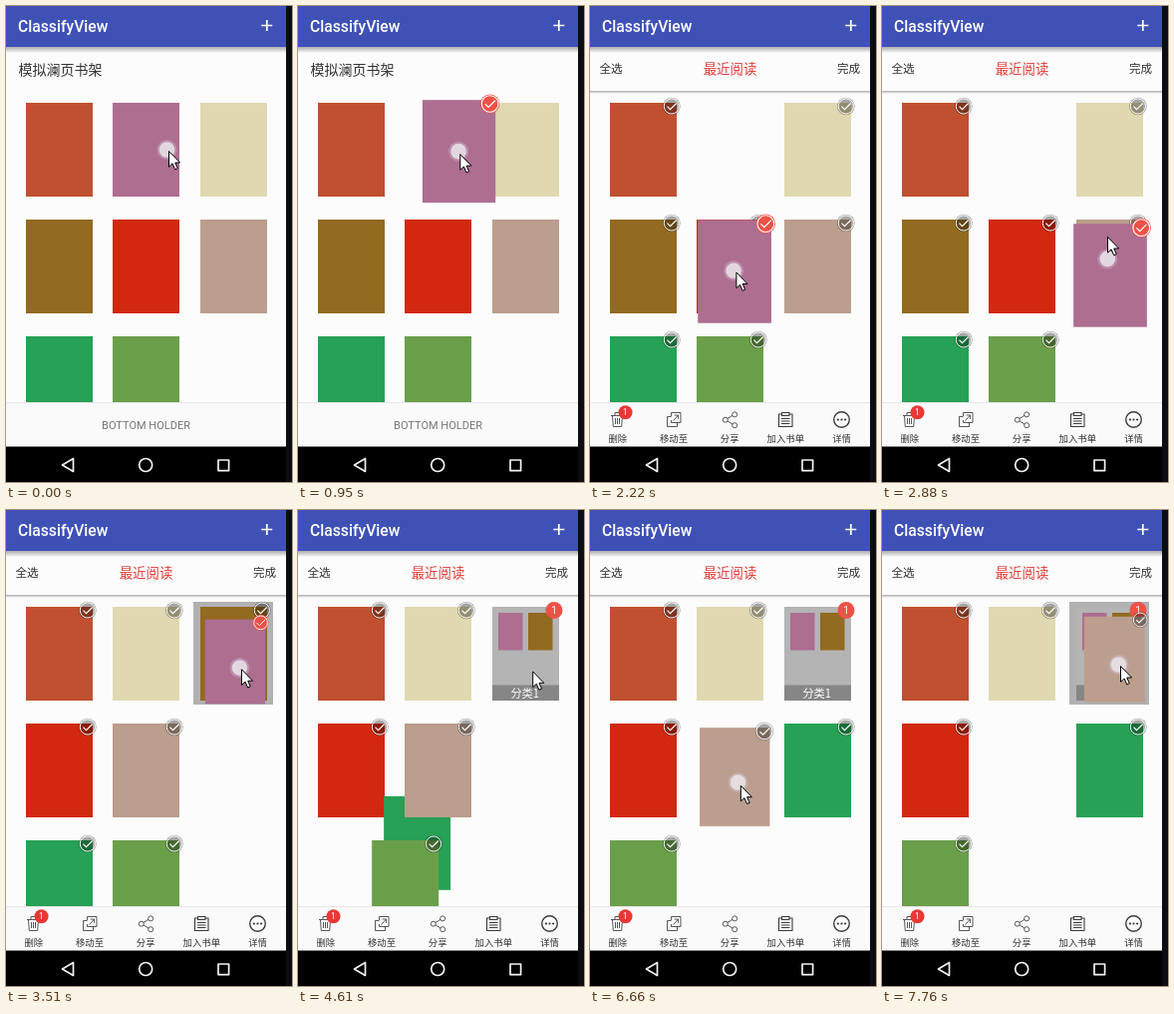
Write an HTML page that moves like this. It is 287 px wide and 477 px high and loops after 8000 ms.

```html
<!DOCTYPE html>
<html lang="zh-CN">
<head>
<meta charset="utf-8">
<title>ClassifyView</title>
<style>
  html, body { margin: 0; width: 100%; height: 100%; overflow: hidden; background: #fcfcfc; }
  svg { display: block; width: 100vw; height: 100vh; }
  text { font-family: Roboto, "Noto Sans CJK SC", "Noto Sans CJK", sans-serif; }
  .cjk { font-family: "Noto Sans CJK SC", "Noto Sans CJK", sans-serif; fill: #333; }
  .mid { text-anchor: middle; }
  .line { fill: none; stroke: #3c3c3c; stroke-width: .85; }
  .nav { fill: none; stroke: #f2f2f2; stroke-width: 1.7; stroke-linejoin: round; }
  .label { font-size: 9.4px; text-anchor: middle; }
</style>
</head>
<body>
<svg viewBox="0 0 287 477" preserveAspectRatio="none">
  <defs>
    <linearGradient id="shade" x1="0" y1="0" x2="0" y2="1">
      <stop offset="0" stop-color="#000" stop-opacity=".32"/>
      <stop offset="1" stop-color="#000" stop-opacity="0"/>
    </linearGradient>
  </defs>
  <rect width="287" height="477" fill="#fcfcfc"/>

  <g id="shelf">
    <rect id="frame" x="188" y="92" width="80" height="103" fill="#b1b1b1"/>
  </g>

  <text class="cjk" x="12.5" y="68.5" font-size="14">模拟澜页书架</text>
  <g id="editBar">
    <rect y="85" width="281" height="3" fill="url(#shade)"/>
    <rect y="41" width="281" height="44" fill="#fcfcfc"/>
    <text class="cjk" x="9.5" y="67" font-size="11.6">全选</text>
    <text class="cjk mid" x="140.5" y="67.8" font-size="13.4" style="fill:#e53935">最近阅读</text>
    <text class="cjk" x="248" y="67" font-size="11.6">完成</text>
  </g>

  <rect y="41" width="281" height="6" fill="url(#shade)"/>
  <rect width="281" height="41" fill="#3f51b5"/>
  <text x="12" y="25.9" font-size="15.7" font-weight="500" fill="#fff">ClassifyView</text>
  <path d="M256.3 19.5H267.3M261.8 14V25" stroke="#fff" stroke-width="1.7"/>

  <rect y="397.5" width="281" height="44.5" fill="#fafafa"/>
  <rect y="397" width="281" height="1" fill="#e6e6e6"/>
  <text class="mid" x="140.5" y="423.6" font-size="11" fill="#757575">BOTTOM HOLDER</text>

  <g id="tools">
    <rect y="398" width="281" height="44" fill="#fafafa"/>
    <path class="line" d="M21 410.5H34M25 410V407.5H30V410M22.5 411L23.3 421.5H31.7L32.5 411M25.5 413V419M27.5 413V419M29.5 413V419"/>
    <path class="line" d="M81.5 411.5H77.5V421.5H87.5V417.5M81.5 411V407.5H91V417.5H81.5V415M83.5 415.5L88.3 410.3M84.8 410H88.5V413.8"/>
    <path class="line" d="M138 413.4L143 410.4M138 416L143 419"/>
    <g class="line"><circle cx="135.8" cy="414.7" r="2.5"/><circle cx="145.2" cy="409.4" r="2.5"/><circle cx="145.2" cy="420.2" r="2.5"/></g>
    <path class="line" d="M192.5 409H189.5V421.5H203V409H200M192.5 407.5H200V410.5H192.5ZM192 413.5H200.5M192 416H200.5M192 418.5H200.5" style="stroke-width:1.1"/>
    <circle class="line" cx="252.5" cy="414.5" r="7.8" style="stroke-width:1.4"/>
    <path d="M248.9 414.5h0M252.5 414.5h0M256.1 414.5h0" stroke="#333" stroke-width="2.2" stroke-linecap="round"/>
    <g class="label">
      <text class="cjk" x="27.8" y="437.3">删除</text>
      <text class="cjk" x="84" y="437.3">移动至</text>
      <text class="cjk" x="140.2" y="437.3">分享</text>
      <text class="cjk" x="196.3" y="437.3">加入书单</text>
      <text class="cjk" x="252.6" y="437.3">详情</text>
    </g>
    <circle cx="35.5" cy="407.2" r="7" fill="#e53935"/>
    <text class="mid" x="35.5" y="410.2" font-size="8.5" fill="#fff">1</text>
  </g>

  <rect y="441.5" width="287" height="35.5" fill="#000"/>
  <rect x="281" width="6" height="477" fill="#0b0d10"/>
  <path class="nav" d="M67.5 453.5V466.5L56.5 460Z"/>
  <circle class="nav" cx="140.2" cy="460" r="6.5"/>
  <rect class="nav" x="213" y="455" width="10.6" height="10.6"/>

  <g id="halo">
    <circle r="10" fill="#d6cbe8" opacity=".35"/>
    <circle r="7.8" fill="#ece6ea" opacity=".82"/>
  </g>
  <path id="arrow" d="M.5 .5V16.2L4.1 12.9L6.7 18.8L9.3 17.7L6.8 12H11.6Z" fill="#fff" stroke="#000" stroke-linejoin="round"/>
</svg>
<script>
const LOOP = 8000, TICK = 130, W = 67, H = 94;
const HALO_LAG = 60, BOOK_LAG = 100;
const COLORS = ['#c05030', '#ad6e90', '#e0d8b0', '#926a20', '#d22810', '#bb9e8d', '#26a155', '#6a9f4a'];
const PLUM = 1, BROWN = 3, TAN = 5;
const MINI = { [PLUM]: [213, 121.5, .37], [BROWN]: [243, 121.5, .37] };

// where the hand goes: time, x, y
const HAND = [
  [800, 163, 145], [1350, 160, 158], [1450, 152, 178], [1540, 139, 264], [2220, 148, 267],
  [2400, 208, 285], [2640, 229, 285], [2780, 229, 270], [2880, 226, 231], [3080, 239, 175],
  [3300, 236, 159], [4900, 235, 162], [5000, 232, 221], [5150, 217, 270], [5340, 222, 181],
  [5700, 150, 274], [6600, 150, 274], [6780, 153, 280], [7200, 153, 280], [7400, 240, 161],
  [7600, 239, 156]
];

const $ = id => document.getElementById(id);
const ramp = (t, from, to) => Math.min(1, Math.max(0, (t - from) / (to - from)));
const mix = (a, b, p) => a.map((v, i) => v + (b[i] - v) * p);
const show = (el, on) => { el.style.visibility = on ? 'visible' : 'hidden'; };
const move = (el, x, y, s = 1) => el.setAttribute('transform', `translate(${x} ${y}) scale(${s})`);

// centre and scale of a book resting in a grid slot
const slot = i => [Math.round(20 + 87.4 * (i % 3)) + W / 2, 97 + 117 * Math.floor(i / 3) + H / 2, 1];

function hand(t) {
  const i = HAND.findIndex(k => k[0] > t);
  if (i === 0) return HAND[0].slice(1);
  if (i < 0) return HAND[HAND.length - 1].slice(1);
  const [a, b] = [HAND[i - 1], HAND[i]];
  return mix(a, b, ramp(t, a[0], b[0])).slice(1);
}

// a lifted book grows and trails the hand, and shrinks over a merge target
function carry(rest, t, lift, merge) {
  const [x, y] = hand(t - BOOK_LAG);
  return mix(rest, [x - 6 * merge, y - 7 * merge, 1.1 - .2 * merge], lift);
}

function pose(i, t) {
  const firstGap = i > PLUM && i <= TAN, secondGap = i > TAN;
  const p = firstGap ? ramp(t, 2960, 3390) : secondGap ? ramp(t, 4400, 4850) : 0;
  const rest = mix(slot(i), slot(Math.max(0, i - 1)), p);
  if (i === PLUM) {
    const held = carry(slot(i), t, ramp(t, 600, 950), ramp(t, 3200, 3400));
    return mix(held, MINI[i], ramp(t, 3950, 4340));
  }
  if (i === BROWN) return mix(rest, MINI[i], ramp(t, 4070, 4340));
  if (i === TAN) return carry(rest, t, ramp(t, 6530, 6770), ramp(t, 7500, 7700));
  return rest;
}

function group(html) {
  const g = document.createElementNS('http://www.w3.org/2000/svg', 'g');
  g.innerHTML = html;
  $('shelf').append(g);
  return g;
}

const books = COLORS.map((color, i) => {
  const disc = i === PLUM ? 'fill="#ee5148"' : 'fill="#000" fill-opacity=".34"';
  const el = group(`<rect x="${-W / 2}" y="${-H / 2}" width="${W}" height="${H}" fill="${color}"/>
    <g transform="translate(28.4 -43.5)" fill="none" stroke="#fff">
      <circle r="8.8" ${disc} stroke="none"/><circle r="7.6"/>
      <path d="M-4.4 .2L-1.4 3.2L4.8 -3" stroke-width="1.1"/></g>`);
  return { el, badge: el.lastElementChild };
});

const mini = i => `<rect x="${MINI[i][0] - 12}" y="103" width="24.5" height="37.5" fill="${COLORS[i]}"/>`;
const folder = group(`<rect x="195" y="97" width="${W}" height="${H}" fill="#b4b4b4"/>
  ${mini(PLUM)}${mini(BROWN)}
  <rect x="195" y="175.5" width="${W}" height="15.5" fill="#868686"/>
  <text class="cjk mid" x="227.7" y="187.8" font-size="11.2" style="fill:#fff">分类1</text>
  <circle cx="257" cy="100.6" r="8.5" fill="#ee5148"/>
  <text class="mid" x="257" y="104.2" font-size="10" fill="#fff">1</text>`);
// movable books stay on top
$('shelf').append(books[TAN].el, books[PLUM].el);

function draw(time) {
  const t = time - (time - 20) % TICK;
  const edit = ramp(t, 1050, 1340);
  const merged = t >= 4440;

  books.forEach(({ el, badge }, i) => {
    move(el, ...pose(i, t));
    badge.style.opacity = edit;
  });
  books[PLUM].badge.style.opacity = t >= 930 && t < 4050 ? 1 : 0;
  show(books[PLUM].el, !merged);
  show(books[BROWN].el, !merged);
  show(folder, merged);
  show($('frame'), (t >= 3390 && !merged) || t >= 7560);

  move($('editBar'), 0, -48 * (1 - edit));
  move($('tools'), 0, 44 * (1 - edit));
  show($('editBar'), edit > 0);
  show($('tools'), edit > 0);

  const [x, y] = hand(t - HALO_LAG);
  move($('halo'), x - 1.5, y - 1);
  show($('halo'), t < 4050 || t > 5800);
  move($('arrow'), ...hand(t));
}

const start = performance.now();
function tick() {
  draw((performance.now() - start) % LOOP);
  requestAnimationFrame(tick);
}
tick();
</script>
</body>
</html>
```
